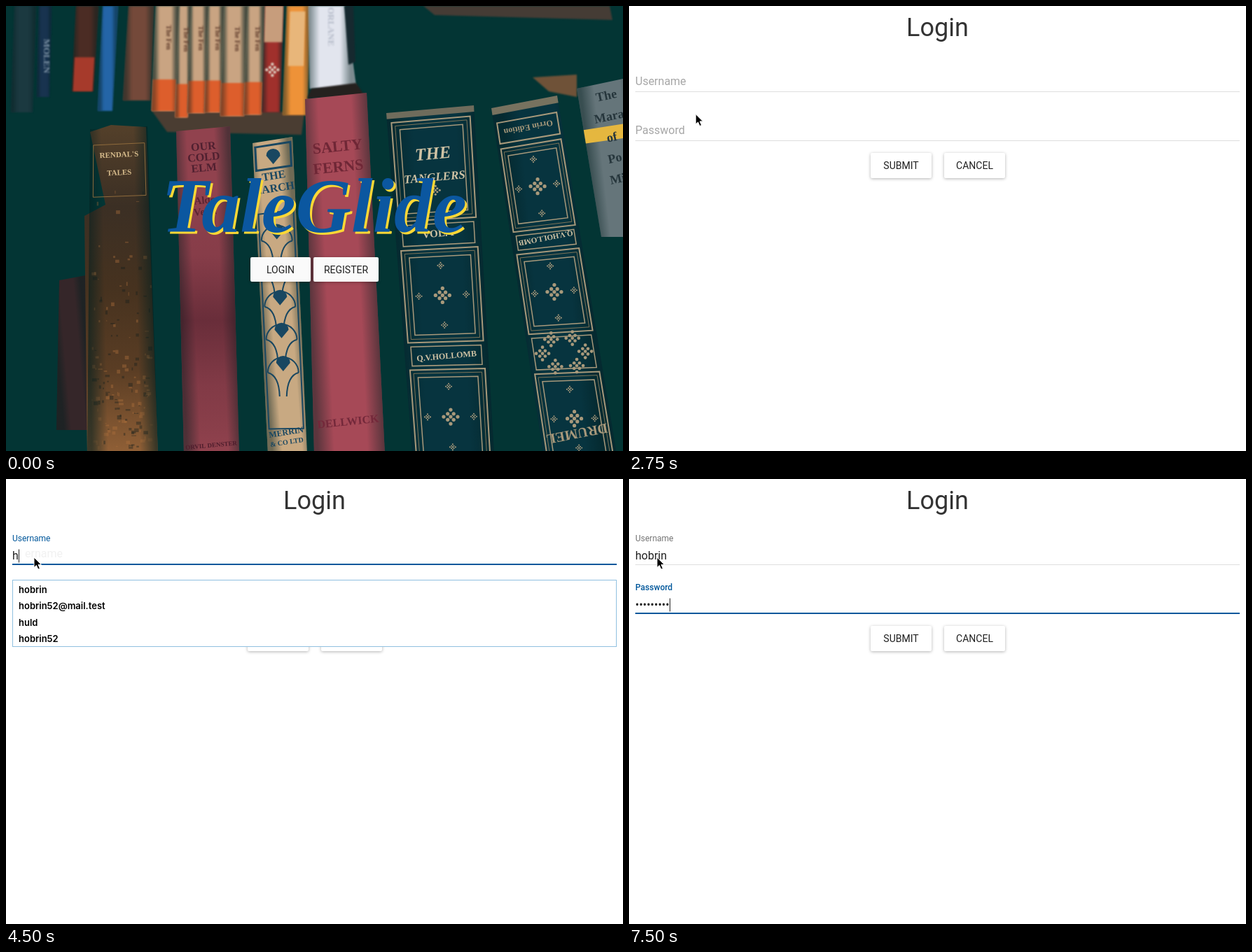
Write an HTML page with a canvas that moves like this. It is 881 by 636 pixels and loops after 8000 ms.

```html
<!DOCTYPE html>
<html lang="en">
<head>
<meta charset="utf-8">
<title>Book lending login</title>
<style>
html, body { margin: 0; width: 100%; height: 100%; overflow: hidden; background: #fff; }
canvas, svg { position: absolute; left: 0; top: 0; }
text { font: 16px Roboto, sans-serif; fill: #212121; white-space: pre; }
.mid { text-anchor: middle; }
.btn text { font-size: 14px; }
.btn rect { fill: #fff; filter: drop-shadow(0 1px 2px rgba(0,0,0,.3)); }
#home .btn rect { fill: #fafafa; }
.brand { font: italic bold 110px "Liberation Serif", serif; }
.list text { font: 600 13px Inter, sans-serif; fill: #000; }
</style>
</head>
<body>
<canvas id="photo" width="881" height="636"></canvas>
<svg width="881" height="636" viewBox="0 0 881 636">
  <g id="home">
    <text class="brand mid" x="443" y="326" style="fill:#fdd835">TaleGlide</text>
    <text class="brand mid" x="440" y="323" style="fill:#0b57a0">TaleGlide</text>
  </g>
  <g id="form">
    <text class="mid" x="440.5" y="43" style="font-size:36px;fill:#333">Login</text>
  </g>
  <path id="cursor" d="M0 0V14.5L3.4 11.4L5.8 17L8.4 15.9L6 10.4H10.4Z" stroke="#fff" />
</svg>
<script>
const $ = id => document.getElementById(id);
const c = $('photo').getContext('2d');

// ---- bookshelf picture ----
let seed = 7;
const rnd = () => (seed = seed * 16807 % 2147483647) / 2147483647;

function trace(p) {
  c.beginPath();
  for (let i = 0; i < p.length; i += 2) c.lineTo(p[i], p[i + 1]);
  c.closePath();
}
function poly(color, p) { c.fillStyle = color; trace(p); c.fill(); }

// A book is a quad, clockwise from the top left; u, v run 0..1 across and down it.
function at(q, u, v) {
  const mix = i => (q[i] * (1 - u) + q[i + 2] * u) * (1 - v) + (q[6 + i] * (1 - u) + q[4 + i] * u) * v;
  return [mix(0), mix(1)];
}
const patch = (q, u0, v0, u1, v1) =>
  [...at(q, u0, v0), ...at(q, u1, v0), ...at(q, u1, v1), ...at(q, u0, v1)];

function fade(q, from, to, stops) {
  const g = c.createLinearGradient(...from, ...to);
  stops.forEach((s, i) => g.addColorStop(i / (stops.length - 1), s));
  poly(g, q);
}
function shade(q, edge) {
  const dark = `rgba(2,30,30,${edge})`, clear = 'rgba(2,30,30,0)';
  fade(q, at(q, 0, .5), at(q, 1, .5), [dark, clear, clear, clear, dark]);
}
function book(color, x, y, w, tilt, x2, w2, y2 = 640) {
  const q = [x, y, x + w, y - tilt, x2 + w2, y2, x2, y2];
  poly(color, q);
  shade(q, .45);
  return q;
}
function frame(q, u, v0, v1, color, w) {
  c.strokeStyle = color; c.lineWidth = w;
  trace(patch(q, u, v0, 1 - u, v1)); c.stroke();
}
// Text centred on a book, following the tilt of its top edge.
function label(q, s, v, size, color, turn = 0, style = 'bold') {
  c.save();
  c.translate(...at(q, .5, v));
  c.rotate(Math.atan2(q[3] - q[1], q[2] - q[0]) + turn);
  c.font = `${style} ${size}px "Liberation Serif", serif`;
  c.textAlign = 'center'; c.fillStyle = color;
  c.fillText(s, 0, 0);
  c.restore();
}
function flower([x, y], r, color) {
  c.fillStyle = color;
  for (let i = 0; i <= 8; i++) {
    const a = i * Math.PI / 4, d = i === 8 ? 0 : i % 2 ? r * .6 : r;
    c.beginPath(); c.arc(x + d * Math.cos(a), y + d * Math.sin(a), r * .26, 0, 7); c.fill();
  }
}

// Gilt panels and title bands alternate between the stops.
function gilt(q, stops, gold) {
  for (let i = 0; i + 1 < stops.length; i++) {
    const a = stops[i], b = stops[i + 1], m = (a + b) / 2;
    if (i % 2) { frame(q, .08, a + .012, b - .012, gold, 1.5); continue; }
    frame(q, .05, a, b, gold, 2);
    frame(q, .09, a + .01, b - .01, '#7d7358', 1);
    frame(q, .14, a + .022, b - .022, gold, 1.5);
    if (i === 0 && a < .1) continue;
    flower(at(q, .5, m), 10, gold);
    for (let k = 0; k < 4; k++) {
      const t = k * Math.PI / 2;
      flower(at(q, .5 + .28 * Math.cos(t), m + (b - a) * .32 * Math.sin(t)), 4, gold);
    }
  }
}

function backRow() {
  c.filter = 'blur(1px)';
  poly('#453c35', [596, 0, 862, 0, 866, 20, 612, 13]);
  poly('#6f5238', [752, 102, 815, 98, 815, 130, 775, 122]);
  poly('#4a3d32', [207, 148, 426, 152, 422, 184, 230, 180]);
  book('#1b3940', 12, 0, 31, 0, 7, 31, 152);
  label(book('#18334f', 47, 0, 18, 0, 44, 18, 130), 'MOLEN', .55, 13, '#8196a8', Math.PI / 2);
  const ends = book('#4b2c24', 100, 0, 32, 0, 94, 31, 122);
  poly('#a63a2b', patch(ends, .05, .6, .95, 1));
  book('#2465a7', 138, 0, 22, 0, 131, 21, 150);
  book('#74493a', 175, 0, 36, 0, 167, 39, 135);

  let x = 214;
  for (const w of [33, 17, 24, 22, 33, 24]) {
    const q = book('#c9a482', x, 0, w, 0, x - 6, w + 1, 150 + 10 * rnd());
    poly('#dd5e2c', patch(q, 0, .7, 1, 1));
    shade(q, .4);
    label(q, 'The Fen', .3, 10, '#5d3a2a', Math.PI / 2);
    x += w + .5;
  }
  const red = book('#a0302c', 370, 0, 26, 0, 366, 25, 152);
  poly('#c79d7c', patch(red, 0, 0, 1, .34));
  flower(at(red, .5, .6), 8, '#e0d8ca');
  const amber = book('#ee9238', 401, 0, 33, 0, 395, 35, 156);
  poly('#e8b67a', patch(amber, .15, .05, .8, .55));
  const white = book('#e2e5ee', 432, 0, 52, 0, 434, 66, 118);
  poly('#16292f', [483, 0, 496, 0, 499, 80, 489, 84]);
  label(white, 'ORLANE', .25, 13, '#b4bac8', Math.PI / 2);
  poly('#25211f', [436, 118, 500, 110, 512, 128, 430, 132]);
  c.filter = 'none';
}

function wornBook() {
  book('#352629', 76, 392, 38, 7, 72, 44, 606);
  const shape = [120, 180, 150, 170, 200, 173, 217, 640, 116, 640, 112, 300, 142, 284];
  fade(shape, [0, 170], [0, 636], ['#54402a', '#3b2f24', '#46321f', '#5a3d24', '#8f5f36']);
  for (let i = 0; i < 160; i++) {
    const y = 250 + 380 * Math.sqrt(rnd());
    c.fillStyle = rnd() < .6 ? 'rgba(176,112,60,.4)' : 'rgba(20,30,28,.4)';
    c.fillRect(122 + rnd() * 84, y, 1 + rnd() * 6, 1 + rnd() * 5);
  }
  const q = [120, 176, 202, 172, 217, 640, 116, 640];
  shade(q, .6);
  frame(q, .06, .05, .21, '#8f6b3c', 1);
  label(q, "RENDAL'S", .09, 11, '#d8bd8d');
  label(q, 'TALES', .145, 11, '#d8bd8d');
}

function creamBook() {
  const q = book('#c8a982', 352, 196, 57, 9, 374, 56), ink = '#194761';
  frame(q, .06, .015, .09, ink, 3);
  frame(q, .06, .23, .92, ink, 2);
  label(q, 'THE', .125, 16, ink);
  label(q, 'LARCH', .165, 16, ink);
  for (let v = .05; v < .8; v += v < .1 ? .24 : .105) {
    const [x, y] = at(q, .5, v);
    c.fillStyle = c.strokeStyle = ink; c.lineWidth = 2;
    c.beginPath(); c.arc(x, y, 10, Math.PI, 0); c.lineTo(x, y + 12); c.fill();
    if (v < .1) continue;
    c.beginPath(); c.arc(x, y + 14, 22, Math.PI, 0); c.stroke();
    for (const s of [-1, 1]) {
      c.beginPath(); c.moveTo(x + s * 22, y + 14);
      c.quadraticCurveTo(x + s * 6, y + 18, x + s * 5, y + 48); c.stroke();
    }
  }
  label(q, 'MERRIN', .94, 12, ink);
  label(q, '& CO LTD', .97, 10, ink);
}

function redBooks() {
  const red = book('#91424e', 243, 179, 77, 7, 254, 79);
  fade(red, [0, 170], [0, 636], ['#0000', '#0000', 'rgba(45,15,28,.1)', 'rgba(45,15,28,.4)', 'rgba(45,15,28,.15)', '#0000']);
  ['OUR', 'COLD', 'ELM'].forEach((s, i) => label(red, s, .065 + i * .033, 16, '#4f2030'));
  label(red, 'Aldo', .23, 15, '#5c2531');
  label(red, 'Venn', .265, 15, '#5c2531');
  label(red, 'ORVIL DENSTER', .98, 9, '#4d1d2c');

  const rose = book('#a64957', 427, 133, 88, 9, 440, 101);
  label(rose, 'SALTY', .155, 22, '#6f2736');
  label(rose, 'FERNS', .212, 22, '#6f2736');
  label(rose, 'DELLWICK', .92, 16, '#73283a');
}

function greenBooks() {
  const gold = '#a8997b', pale = '#cfc2a4', green = '#07343f';
  const left = book(green, 543, 153, 125, 11, 580, 117);
  poly('#6f6c5c', patch(left, 0, 0, 1, .018));
  gilt(left, [.03, .32, .405, .675, .755, 1.03], gold);
  label(left, 'THE', .145, 25, pale, 0, 'italic bold');
  label(left, 'TANGLERS', .208, 17, pale, 0, 'italic bold');
  flower(at(left, .5, .235), 6, gold);
  label(left, 'VOL. I', .37, 15, pale);
  label(left, 'Q.V.HOLLOMB', .724, 12, pale);

  const right = book(green, 693, 146, 94, 18, 767, 105);
  poly('#77725f', patch(right, 0, 0, 1, .02));
  frame(right, .05, .045, .105, gold, 2);
  gilt(right, [.12, .36, .425, .655, .77, 1.03], gold);
  label(right, 'Orrin Edition', .065, 12, gold, Math.PI);
  label(right, 'Q.V.HOLLOMB', .38, 11, pale, Math.PI);
  for (let i = 0; i < 6; i++) {
    const a = i * Math.PI / 3;
    flower(at(right, .5 + .3 * Math.cos(a), .712 + .045 * Math.sin(a)), 9, gold);
  }
  label(right, 'DRUMEL', .93, 20, gold, Math.PI);

  const grey = book('#65757a', 815, 118, 80, 17, 850, 70, 330);
  poly('#e5b73f', patch(grey, 0, .28, 1, .37));
  ['The', 'Mara', 'of', 'Po', 'Mi'].forEach((s, i) => label(grey, s, .11 + i * .135, 18, '#26363c'));
}

function drawShelf() {
  poly('#033534', [0, 0, 881, 0, 881, 636, 0, 636]);
  backRow();
  wornBook();
  creamBook();
  redBooks();
  greenBooks();
}

// ---- form ----
const BLUE = '#01579b', USER = 'hobrin';
const names = [USER, USER + '52@mail.test', 'huld', USER + '52'];

const button = (s, x, y, w, h) => `<g class="btn"><rect x="${x}" y="${y}" width="${w}" height="${h}" rx="2"/>
  <text class="mid" x="${x + w / 2}" y="${Math.round(y + h / 2 + 5)}">${s}</text></g>`;
const field = (name, y) => `<g id="${name}" transform="translate(0 ${y})">
  <path d="M9 42.5H872" stroke="#dedede"/><path class="bar" stroke="${BLUE}" stroke-width="2"/>
  <text class="ghost" y="32"></text><text class="label" x="9">${name}</text>
  <text class="value" x="9" y="35"></text><path class="caret" stroke="#222"/></g>`;

$('home').innerHTML += button('LOGIN', 349, 359, 86, 35) + button('REGISTER', 439, 359, 93, 35);
$('form').innerHTML += field('Username', 80) + field('Password', 150) +
  button('SUBMIT', 345, 210, 87, 36) + button('CANCEL', 450, 210, 87, 36) + '<g class="list"></g>';

const clamp = x => Math.max(0, Math.min(1, x));
const ramp = (t, start) => clamp((t - start) / 490);
const show = (el, on) => { el.style.display = on ? '' : 'none'; };

function setField(name, value, focus, blur, faint) {
  const part = k => $(name).querySelector('.' + k);
  const moving = focus > 0 && focus < 1, active = focus > 0 && !blur;
  part('bar').setAttribute('d', `M${440.5 - 431.5 * focus} 42H${440.5 + 431.5 * focus}`);
  part('bar').style.opacity = focus ? 1 - blur : 0;
  const label = part('label');
  label.setAttribute('y', 33 - 24 * focus);
  const heavy = moving || name === 'Password' && focus;
  label.style.cssText = `font-size:${16 - 4 * focus}px;font-weight:${heavy ? 500 : 400};fill:` +
    (active ? BLUE : blur ? '#757575' : '#a6a6a6') + `;opacity:${moving ? .75 : 1}`;
  const ghost = part('ghost');
  ghost.textContent = faint ? name.slice(2) : name;
  ghost.setAttribute('x', faint ? 27 : 9);
  ghost.style.opacity = moving ? .2 : faint ? .06 : 0;
  const text = part('value');
  text.textContent = value;
  const x = Math.round(9 + (value ? text.getComputedTextLength() : 0)) + .5;
  part('caret').setAttribute('d', `M${x} 20.5V39.5`);
  show(part('caret'), active);
}

function setList(y, rows) {
  const h = 1 + 23.5 * rows.length;
  document.querySelector('.list').innerHTML = rows.length ?
    `<rect x="9.5" y="${y}" width="862" height="${h}" fill="#fff" stroke="#90c0e0"/>` +
    rows.map((s, i) => `<text x="18" y="${y + 18 + 23.5 * i}">${s}</text>`).join('') : '';
}

function render(ms) {
  const t = Math.floor(ms % 8000 / 250) * 250, home = t < 2000;
  show($('photo'), home); show($('home'), home); show($('form'), !home);

  const a = clamp((t - 500) / 1000), b = clamp((t - 2000) / 1000), e = b * b * (3 - 2 * b);
  const x = 482 - 89 * a - 353 * e, y = 185 + 199 * a - 272 * e;
  show($('cursor'), t >= 500);
  $('cursor').setAttribute('transform', `translate(${x} ${y})`);
  if (home) return;

  // A capital is typed first, deleted, then the name follows.
  const typed = start => Math.max(0, Math.round((t - start) / 150));
  const user = t === 4000 ? 'H' : USER.slice(0, typed(4350));
  const dots = t >= 7500 ? 9 : Math.min(8, typed(5750));
  const next = ramp(t, 5500);
  setField('Username', t === 4250 ? '' : user, ramp(t, 3000), next, t >= 3500 && t < 4750);
  setField('Password', '•'.repeat(dots), next, 0, false);
  setList(144.5, user && t < 5500 ? names.filter(n => n.startsWith(user.toLowerCase())) : []);
}

drawShelf();
const start = performance.now();
function tick() {
  render(performance.now() - start);
  requestAnimationFrame(tick);
}
tick();
</script>
</body>
</html>
```
